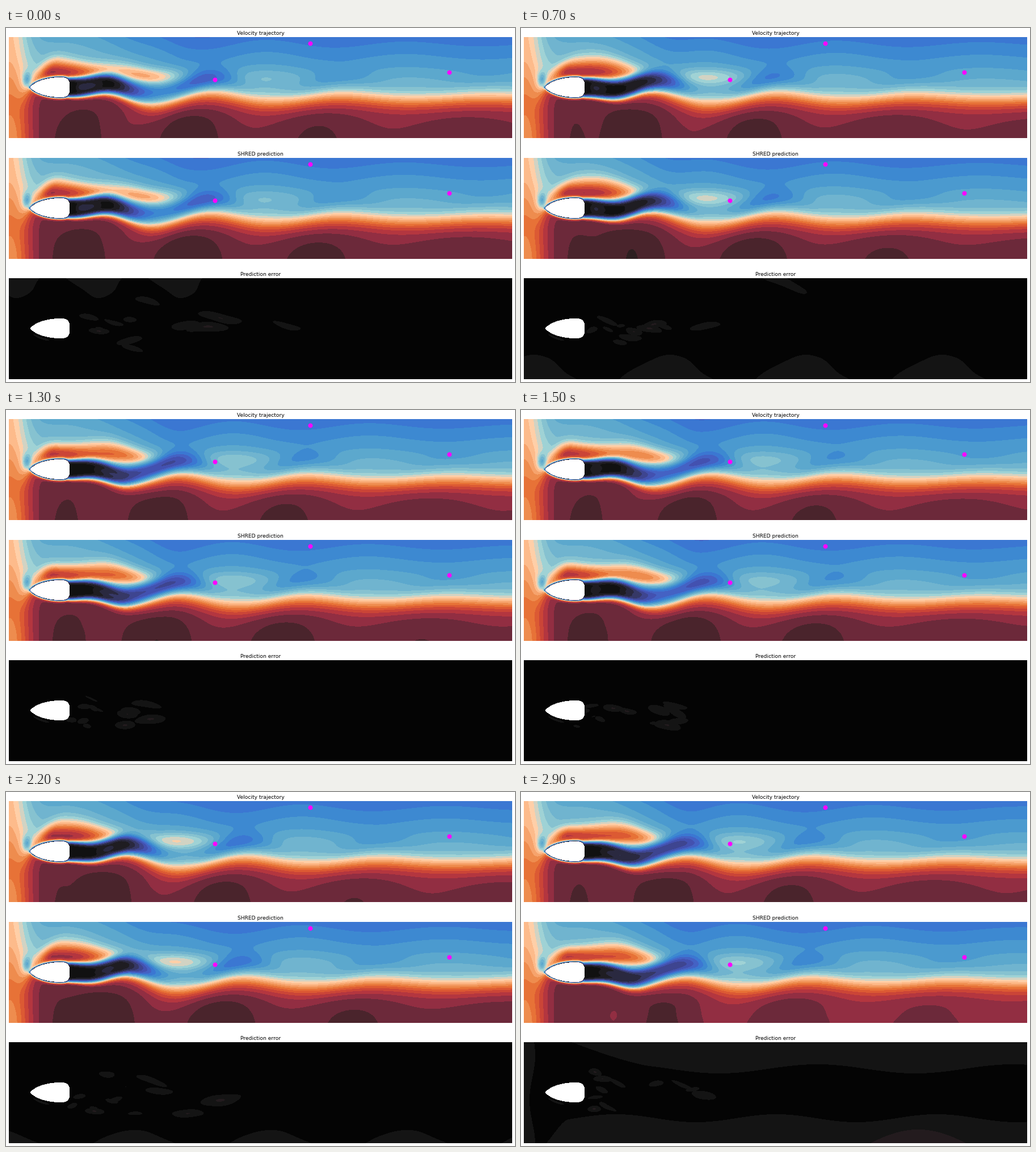
Write a matplotlib script that moves like this. It is 897x624 px and loops after 3000 ms.

```python
import numpy as np
import matplotlib.pyplot as plt
from matplotlib.animation import FuncAnimation
from matplotlib.colors import ListedColormap

W, H, DPI = 897, 624, 64
PT = 72 / DPI                       # points per pixel
LEFT, WIDTH, HEIGHT = 5, 887, 178
TOPS = (16, 229, 441)
FRAMES, STEP = 30, 100
PERIOD = 1.736                      # seconds between two shed vortices

FLOW = ListedColormap("""#050505 #111111 #1f1d22 #2a2940 #363866 #3e4590
 #4351b0 #4462c4 #3b77d2 #3d89d1 #4b9acf #5ca8cd #70b4cf #86c2d0 #9fd2d5
 #d2d3c3 #ffcfa8 #fdbb8b #f6a36c #ee8c4e #e77237 #dc5a33 #cb4537 #b4363f
 #922e42 #6c293a #4a242c #2e1f21 #1e1c1c""".split())
ERROR = ListedColormap(["#040404", "#141414", "#231b1e"])
for cmap in (FLOW, ERROR):
    cmap.set_bad("white")

FLOOR = TOPS[0] + HEIGHT
X, Y = np.meshgrid(LEFT + np.arange(WIDTH) + 0.5,
                   TOPS[0] + np.arange(HEIGHT) + 0.5)


def smooth(a, b, v):
    s = np.clip((v - a) / (b - a), 0, 1)
    return s * s * (3 - 2 * s)


def bell(v, width):
    return np.exp(-(v / width) ** 2)


def after(a, v):
    return np.maximum(v - a, 0)


# Body: pointed nose, blunt rounded tail.
NOSE, SHOULDER, TAIL, MID, HALF = 43, 95, 112.5, 104.5, 17.5
front = np.clip((X - NOSE) / (SHOULDER - NOSE), 0, 1)
rear = np.clip((X - SHOULDER) / (TAIL - SHOULDER), 0, 1)
radius = HALF * (1 - (1 - front) ** 2) ** 0.7 * (1 - rear ** 3) ** (1 / 3)
BODY = (X > NOSE) & (X < TAIL) & (np.abs(Y - MID) < radius)
gap = np.where(X < NOSE, np.hypot(X - NOSE, Y - MID),
               after(0, np.abs(Y - MID) - radius))
WALL = 1 - np.exp(-(gap / 2) ** 1.2) * (1 - smooth(108, 118, X))

# Mean flow: values at both edges, an inlet bump and the slow spot at the nose.
TOP_EDGE = 8.4 + 5.6 * bell(X - 6, 32) + 3.2 * (1 - smooth(100, 320, X))
BOTTOM_EDGE = 26 - 7 * bell(X - 6, 38) - 0.6 * smooth(200, 900, X)
INLET = 2 * bell(Y - 115, 50) * bell(X - 6, 35)
STAGNATION = 5 * bell(X - 37, 8) * bell(Y - 92, 14)
NEAR_SHIFT = 36 * smooth(20, 60, X) * (1 - smooth(110, 280, X))
SWAY = 11 * smooth(110, 250, X) * np.exp(-after(300, X) / 300)
HANG = smooth(45, 115, Y)
AGE = (-128 + np.sqrt(128 ** 2 + 16 * (X - 348))) / 8
RIDE = 76 + 11 * smooth(170, 280, X)
ONSET = smooth(42, 80, X + 0.6 * (Y - 80))
FAR = np.exp(-after(300, X) / 500)


def shear(y):
    return 0.25 * np.tanh((y - 16) / 90) + 0.38 * (1 + np.tanh((y - 124.5) / 21))


def flow(t, bias=0.0):
    """Velocity in colour bands at time t."""
    p = 2 * np.pi * (AGE - t) / PERIOD
    c = np.cos(p)
    depth = Y + HANG * (NEAR_SHIFT + SWAY * np.cos(p - 0.3))
    v = TOP_EDGE + (BOTTOM_EDGE - TOP_EDGE) * shear(depth) + INLET - STAGNATION

    # Far waves above and lobes along the bottom.
    v -= 0.5 * c * smooth(200, 320, X) * FAR * (1 - smooth(75, 110, Y))
    v += 0.8 * np.cos(p + 0.74) * smooth(90, 200, X) * FAR * smooth(120, 170, Y)
    v += bias * smooth(120, 185, Y) * smooth(60, 130, X)

    # Fast layer riding over the wake, breaking into light patches.
    crest = 0.5 - 0.5 * np.cos(p - 0.5)
    away = after(85, X)
    tongue = (crest * (8.5 * bell(away, 245) + 1.3 * np.exp(-away / 500))
              + (1 - crest) * 8.5 * bell(away, 105))
    reach = np.where(Y < RIDE, 15 + 9 * crest * (1 - smooth(140, 260, X)), 15)
    v += tongue * ONSET * bell(Y - RIDE, reach)

    # Slow wake breaking up into separate vortices.
    axis = (105 - 6 * smooth(200, 500, X)
            - 12 * np.cos(p - 0.6) * smooth(112, 220, X))
    core = 0.5 + 0.5 * c
    weight = (core * np.exp(-after(200, X) / 190)
              + (1 - core) * bell(after(165, X), 95)) * smooth(98, 114, X)
    power = 2 + 4 * np.exp(-after(112, X) / 60)
    weight *= np.exp(-(np.abs(Y - axis) / 18) ** power)
    streak = bell(Y - axis, 8) * (0.5 + 0.5 * np.cos(2 * p))
    slow = 1.3 + 2.6 * streak * smooth(115, 135, X) * (1 - smooth(170, 220, X))
    v += (slow - v) * weight

    return np.ma.array(np.clip(v * WALL, 0, 28.9), mask=BODY)


# Error patches: drift downstream, growing with distance from the body.
rng = np.random.default_rng(4)
PATCHES = []
for birth in np.linspace(-0.2, 3.1, 90):
    reach = min(rng.exponential(0.3), 1.2)
    PATCHES.append((birth, 125 + 300 * reach,
                    104 + rng.normal(0, 21 + 8 * reach),
                    rng.uniform(8, 16) + 28 * reach,
                    rng.uniform(3, 6) + 6 * reach,
                    rng.uniform(-0.2, 0.4)))


def error(t):
    wx = X + 5 * np.sin(Y / 9)
    wy = Y + 3 * np.sin(X / 17)
    e = 0.75 * bell(gap - 5, 3) * bell(X - 62, 22) * (Y > 112)
    for birth, x, y, rx, ry, tilt in PATCHES:
        fade = bell(t - birth, 0.28)
        if fade > 0.5:
            dx = wx - x - 120 * (t - birth)
            dy = wy - y - tilt * dx
            e = np.maximum(e, fade * np.exp(-0.69 * ((dx / rx) ** 2 + (dy / ry) ** 2)))

    # Broad swells from the top and bottom edges.
    swell = 0.5 + 0.5 * np.cos((wx - 140 * t - 160) * 2 * np.pi / 240)
    low = 55 * (bell(t - 0.7, 0.15) + bell(t - 2, 0.3)) * swell - 12
    humps = 0.5 + 0.5 * np.cos((wx - 160) * 2 * np.pi / 145)
    high = 45 * bell(t, 0.2) * humps * (1 - smooth(330, 380, X)) - 10
    swells = np.maximum(low - (FLOOR - Y), high - (Y - TOPS[0]))

    # Wide drift at the end of the run.
    rise = smooth(2.65, 2.9, t)
    roof = (63 + 8 * np.sin(X / 55 + 1.5)) * smooth(20, 230, X)
    ground = 150 + 7 * np.sin(X / 45 + 1) + 45 * (1 - smooth(30, 85, X))
    drift = np.maximum.reduce([roof - Y, Y - ground,
                               20 - X + 5 * np.sin(Y / 25)]) - 70 * (1 - rise)
    e = np.maximum(e, np.where(np.maximum(swells, drift) > 0, 0.7, 0))
    deep = Y > FLOOR + 24 - 48 * rise * np.cos((X - 700) / 80) * (X > 580)
    return np.ma.array((e > 0.5).astype(float) + ((e > 0.96) | deep), mask=BODY)


def fields(t):
    bias = 0.2 - 0.75 * smooth(2.5, 2.9, t)
    return flow(t), flow(t - 0.02, bias), error(t)


fig = plt.figure(figsize=(W / DPI, H / DPI), dpi=DPI, facecolor="white")
titles = ("Velocity trajectory", "SHRED prediction", "Prediction error")
images = []
for top, title, cmap, data in zip(TOPS, titles, (FLOW, FLOW, ERROR), fields(0)):
    ax = fig.add_axes([LEFT / W, 1 - (top + HEIGHT) / H, WIDTH / W, HEIGHT / H])
    ax.axis("off")
    images.append(ax.imshow(data, cmap=cmap, vmin=0, vmax=cmap.N, aspect="auto",
                            interpolation="nearest",
                            extent=(LEFT, LEFT + WIDTH, HEIGHT, 0)))
    if cmap is FLOW:
        ax.plot([535.5, 780.5, 367.5], [10.8, 62, 75.2], "o", color="#ff00ff",
                ms=8 * PT, mew=0)
        ax.set_xlim(LEFT, LEFT + WIDTH)
        ax.set_ylim(HEIGHT, 0)
    fig.text((LEFT + WIDTH / 2) / W, 1 - (top - 4.2) / H, title, ha="center",
             va="baseline", family="DejaVu Sans", fontsize=9.17 * PT, color="black")


def update(i):
    for image, data in zip(images, fields(i * STEP / 1000)):
        image.set_data(data)
    return images


anim = FuncAnimation(fig, update, frames=FRAMES, interval=STEP, repeat=True,
                     repeat_delay=0, blit=False)
plt.show()
```
